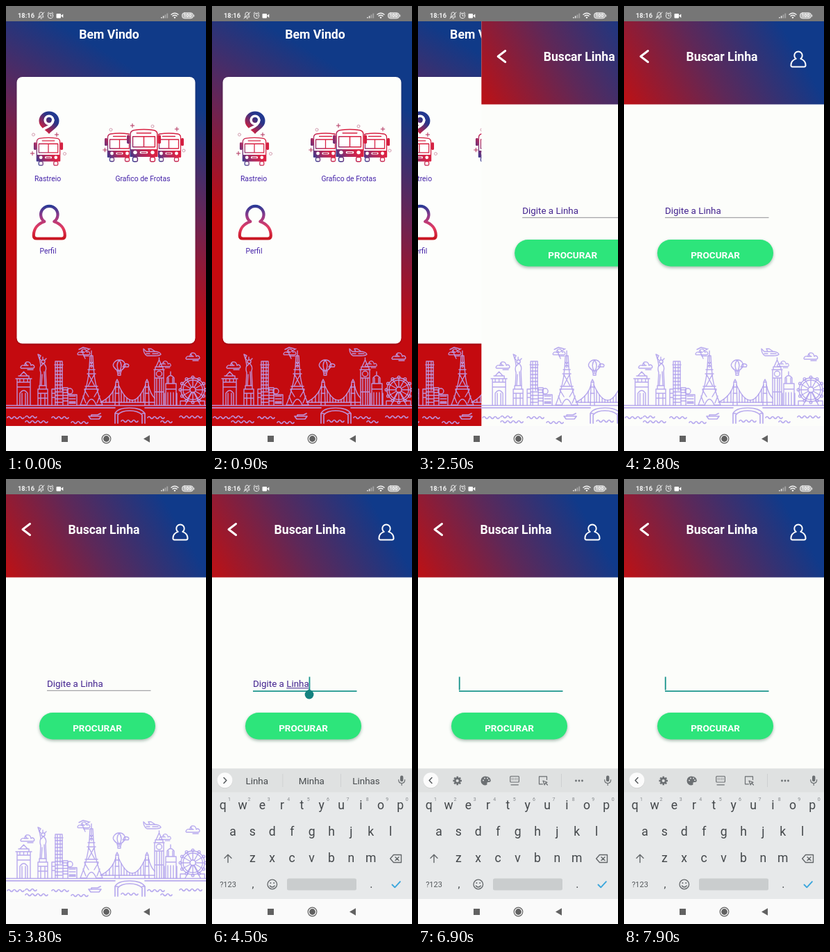
Recreate the animation shown at these times as an HTML page with a canvas. Size 288 px wide and 640 px high, loop 8 s.

```html
<!DOCTYPE html>
<html lang="pt">
<head>
<meta charset="utf-8">
<title>Buscar Linha</title>
<style>
html, body { margin: 0; width: 100%; height: 100%; overflow: hidden; background: #fff; }
canvas { display: block; width: 288px; height: 640px; }
</style>
</head>
<body>
<canvas id="stage"></canvas>
<script>
const W = 288, H = 640, LOOP = 8000;
const TEXT = 'Digite a Linha';
const SLIDE = 2380, SLIDE_LEN = 380;
const FOCUS = 4050, KEYS_UP = 4100, KEYS_LEN = 250;
const FIRST_DELETE = 5500, REPEAT = 5925, REPEAT_GAP = 75;
const CLEARED = REPEAT + (TEXT.length - 2) * REPEAT_GAP;

const canvas = document.getElementById('stage');
const dpr = window.devicePixelRatio || 1;
canvas.width = W * dpr;
canvas.height = H * dpr;
const c = canvas.getContext('2d');

const clamp = v => Math.max(0, Math.min(1, v));
const easeOut = v => 1 - Math.pow(1 - clamp(v), 3);

function rect(x, y, w, h, fill) { c.fillStyle = fill; c.fillRect(x, y, w, h); }
function round(x, y, w, h, r, fill) {
  c.beginPath();
  c.roundRect(x, y, w, h, r);
  if (fill) { c.fillStyle = fill; c.fill(); } else c.stroke();
}
function path(d, fill) {
  const p = new Path2D(d);
  if (fill) { c.fillStyle = fill; c.fill(p); } else c.stroke(p);
}
function circle(x, y, r, fill) {
  c.beginPath();
  c.arc(x, y, r, 0, 7);
  if (fill) { c.fillStyle = fill; c.fill(); } else c.stroke();
}
function pen(color, width) {
  c.strokeStyle = color;
  c.lineWidth = width;
  c.lineCap = c.lineJoin = 'round';
}
function text(s, x, y, size, color, weight = 400, align = 'center') {
  c.font = `${weight} ${size}px Roboto, sans-serif`;
  c.textAlign = align;
  c.fillStyle = color;
  c.fillText(s, x, y);
}
function gradient(x0, y0, x1, y1, ...stops) {
  const g = c.createLinearGradient(x0, y0, x1, y1);
  stops.forEach((s, i) => g.addColorStop(i / (stops.length - 1), s));
  return g;
}
function at(x, y, scale, draw) {
  c.save();
  c.translate(x, y);
  c.scale(scale, scale);
  draw();
  c.restore();
}

function statusBar() {
  rect(0, 0, W, 22, '#767676');
  text('18:16', 17, 17, 9.3, '#f4f4f4', 700, 'left');
  pen('#eee', 1);
  path('M47 16h7l-1-2v-3q-.4-2-2.5-2t-2.5 2v3zM50 18h1.5M46 18l9-9');
  circle(64, 14, 3.7);
  path('M64 12v2.3h1.6M60 10.5l1.8-1.5M68 10.5l-1.8-1.5');
  round(72.5, 11, 6.5, 6.5, 1, '#fff');
  path('M79 14l3.3-2.6v5.6z', '#fff');
  for (let i = 0; i < 4; i++) rect(223 + i * 2.8, 16 - i * 1.8, 1.8, 1.5 + i * 1.8, i < 2 ? '#ddd' : '#a5a5a5');
  pen('#f4f4f4', 1.4);
  path('M238 12.2q5-4 10 0M240 14.4q3-2.4 6 0');
  circle(243, 16.6, 1.2, '#fff');
  pen('#eee', 1);
  round(253.5, 9.8, 16, 8, 3.5, '#b5b5b5');
  round(253.5, 9.8, 16, 8, 3.5);
  rect(270.3, 12.5, 1, 3, '#eee');
  text('100', 261.5, 16.3, 6.6, '#fff', 700);
}

function navBar() {
  rect(0, 604, W, 36, '#fafafa');
  rect(80, 618, 9, 9, '#616161');
  pen('#616161', 1.2);
  circle(144.5, 622.5, 6.3);
  circle(144.5, 622.5, 4.4, '#616161');
  path('M198 622.5l9-5.2v10.4z', '#616161');
}

function cloud(x, y, s = 1) {
  at(x, y, s, () => path('M-9 4h17q3-1 1-4q-2-2-4 0q-1-6-6-5q-3 1-3 5q-4-1-5 1q-2 2 0 3M-5 0h6M0 6h8M-3-3q2 1 2 3'));
}

function skyline(color) {
  pen(color, 1.4);
  // gate tower
  path('M16 574V536h19v38M14 536h23M18 532h15v4M20 532l5.5-6 5.5 6M16 548h19M20 574V557q5.500-8 11 0v17M16 541h19M20 536v5M25.500 536v5M31 536v5M23 557v17M28 557v17');
  // statue
  path('M46 574v-23h14v23M48 551v-5h10v5M46 557h14M46 564h14M49 546l1-19q-2-5 0-10l-2-12M58 546l-1-21q2-6-2-10M50 518l4-4M46 501l4 2-2 4zM52 530l-1 15M55 526l1 19M50 557v17M56 557v17');
  circle(53.5, 511.5, 2.5);
  path('M50 509l-2-2M53 508v-3M56 509l2-2');
  // high-rises
  path('M71 574V511h10v42M70 516h12M74 511v63M78 511v42M66 574v-23h5M82 574v-25h7v25M89 574v-15h13v15M66 557h5M66 563h5');
  for (let y = 520; y < 572; y += 5) path(`M71 ${y}h10`);
  for (let y = 552; y < 572; y += 4) path(`M82 ${y}h7M91 ${Math.min(571, y + 9)}h9`);
  circle(92, 554, 4);
  // lattice tower
  path('M123 496v7M121 503h4l1 17q2 30 13 54h-9q-7-17-14 0h-9q11-26 13-54zM118 523h10M117 529h12M114 547h18M113 551h20M123 503v17M119 530l9 17M127 530l-9 17M121 512l5 8M125 512l-5 8M113 552l6 10M133 552l-6 10M111 561l4 10M135 561l-4 10');
  // suspension bridge
  path('M157 574l1-33h4l1 33M200 574l1-33h4l1 33M158 541l2-4 2 4M201 541l2-4 2 4M157 548h6M200 548h6M157 557h6M200 557h6');
  path('M136 570q17-8 22-25M162 545q20 44 39 0M205 545q3 13 9 19M138 570h76');
  for (let x = 166; x < 200; x += 4) {
    const u = (x - 181.5) / 19.5;
    path(`M${x} ${567 - 22 * u * u}V570`);
  }
  path('M144 566v4M149 561v9M154 554v16');
  // clock tower
  path('M214 574v-51h13v51M213 523h15M215 523v-4h11v4M216 519l4.500-10 4.500 10M220.500 509v-3M214 535h13M217 536v38M221 536v38M224 536v38M214 555h13');
  circle(220.5, 529, 4);
  // cathedral
  path('M230 574v-31h15v31M232 543v-8q5-7 10 0v8M237 531v-5M230 551h15M228 574v-17M246 557v17M233 574v-18M237 574v-18M241 574v-18M234 535v8M240 535v8');
  // wheel
  circle(269, 552, 17);
  circle(269, 552, 14);
  circle(269, 552, 4);
  for (let i = 0; i < 12; i++) {
    const a = i * Math.PI / 6, x = Math.cos(a), y = Math.sin(a);
    path(`M${269 + 4 * x} ${552 + 4 * y}L${269 + 15 * x} ${552 + 15 * y}`);
    circle(269 + 18 * x, 552 + 18 * y, 1.8);
  }
  path('M268 555l-10 19M270 555l10 19M251 574v-6h7M286 574v-6h-7');
  // balloon
  path('M163 526q-11-7-8-12q3-5 8-5q6 0 8 5q3 5-8 12M163 526q-6-9 0-17q6 8 0 17M160 525l1 3h4l1-3M161 528v3h4v-3');
  path('M169 518q2-5 6-3q3 1 1 4h-8');
  // plane
  path('M198 493l4 4h14q6 1 7 4q-2 2-8 2h-12q-5-3-5-10M207 497l-2-4h4l6 4M209 503l-4 0M211 500h8M202 500h5');
  cloud(31, 517);
  cloud(229, 515, .85);
  cloud(269, 504);
  cloud(112, 498, .9);
  path('M110 498l4 9M114 497l7-4M105 494l6-3 8 2');
  // embankment and river
  pen(color, 1.7);
  path('M0 574.500H288M0 577.800H157M200 577.800H288');
  path('M157 600V586q4-8 21-8t22 8v14M161 600V588q5-6 17-6t18 6v12M157 586h4M196 586h4');
  for (const [x, y, n] of [[2, 592, 3], [28, 598, 4], [28, 591, 2], [66, 592, 3], [94, 599, 3], [204, 592, 3], [223, 598, 2], [250, 591, 4], [166, 597, 3]])
    path(`M${x} ${y}` + 'q2-3 4 0t4 0'.repeat(n));
  path('M119 590h18l-3 4h-12zM123 590v-2h9l4-2');
}

function bus(x, y, s) {
  at(x, y, s, () => {
    const paint = gradient(-18, 14, 16, -8, '#303a92', '#a52a62', '#dc2344', '#d41f40');
    round(-18, -20, 36, 38, 4, '#fff');
    pen(paint, 1.3);
    path('M-17 13V-15q0-4 4-5q13-2 26 0q4 1 4 5V13zM-14-12H14V1H-14zM-9-16.500H9M0-12V1');
    round(-21.5, -14, 4, 11, 1.5, paint);
    round(17.5, -14, 4, 11, 1.5, paint);
    rect(-17, 4, 34, 9.5, paint);
    circle(-11, 8, 2.4, '#fff');
    circle(11, 8, 2.4, '#fff');
    round(-5, 6.5, 10, 3, 1.2, '#fff');
    path('M-3 8h6');
    round(-14, 14, 6, 5.5, 1.5);
    round(8, 14, 6, 5.5, 1.5);
  });
}

function sparkles(dots, stars) {
  pen('#c98aa0', .8);
  dots.forEach(([x, y]) => circle(x, y, 2));
  pen('#b0305c', 1);
  stars.forEach(([x, y]) => path(`M${x - 2.7} ${y}h5.4M${x} ${y - 2.7}v5.4`));
}

function person(x, y, s, paint, width) {
  at(x, y, s, () => {
    pen(paint, width);
    path('M-7 10C-16 13-22.500 20-22.500 30Q-22.500 34.500-18 34.500H18Q22.500 34.500 22.500 30C22.500 20 16 13 7 10A12.200 12.200 0 1 0-7 10Z');
  });
}

function home() {
  rect(0, 22, W, 583, gradient(144, 66, 3, 301, '#103a88', '#6a2454', '#c40a0f'));
  text('Bem Vindo', 148.5, 47, 17.7, '#fff', 700);
  skyline('rgba(190,156,232,.92)');
  c.save();
  c.shadowColor = 'rgba(40,0,20,.35)';
  c.shadowBlur = 3 * dpr;
  c.shadowOffsetY = dpr;
  round(15.5, 102, 257, 383.5, 8, '#fdfefc');
  c.restore();

  const pin = gradient(53, 178, 73, 156, '#d9203c', '#7a2a66', '#2a3488', '#1f3a93');
  path('M62 184C57 178 47.500 174 47.500 165.500A14.500 14 0 0 1 76.500 165.500C76.500 174 67 178 62 184Z', pin);
  pen('#fff', 3.6);
  circle(62, 164, 5.8);
  path('M67.800 164q0 7-13 12.500');
  bus(61, 210, .98);
  sparkles([[39.5, 185], [84.5, 212.5]], [[73, 185], [38, 212]]);
  text('Rastreio', 60, 252, 10.4, '#4422a8');

  bus(163.5, 204, 1);
  bus(234.5, 204, 1);
  bus(198.5, 201.5, 1.14);
  sparkles([[151, 178], [211, 173], [256, 208]], [[182, 172], [246, 177], [142.5, 207]]);
  text('Grafico de Frotas', 197, 252, 10.4, '#4422a8');

  person(62.3, 300, 1, gradient(0, -13, 0, 35, '#283a96', '#9a3a88', '#e23a60', '#c8141f'), 4.2);
  text('Perfil', 60.5, 356, 10.4, '#4422a8');
}

function search(t) {
  rect(0, 22, W, 583, '#fcfdfa');
  rect(0, 22, W, 119.5, gradient(14, 150, 226, 26, '#b81218', '#5e2858', '#103a8a'));
  pen('#fff', 3);
  path('M34.500 64.500L24 72.500L34.500 80.500');
  text('Buscar Linha', 141, 79, 17.6, '#fff', 700);
  person(251, 71.2, .47, '#fff', 4.2);
  skyline('rgba(172,156,236,.85)');

  c.save();
  c.shadowColor = 'rgba(0,60,30,.35)';
  c.shadowBlur = 4 * dpr;
  c.shadowOffsetY = 2 * dpr;
  round(48, 336, 167, 38.5, 19.2, '#2de57b');
  c.restore();
  text('PROCURAR', 131.5, 363, 13.5, '#fff', 700);
  field(t);
}

function field(t) {
  const focused = t >= FOCUS;
  let gone = t >= FIRST_DELETE ? 1 : 0;
  if (t >= REPEAT) gone += 1 + Math.floor((t - REPEAT) / REPEAT_GAP);
  const shown = TEXT.slice(0, Math.max(0, TEXT.length - gone));
  text(shown, 59, 299, 13.4, '#43238f', 400, 'left');
  const end = 59 + c.measureText(shown).width;
  if (!focused) { rect(59, 303.8, 149.5, 1, '#8f8f95'); return; }

  rect(59, 304.3, 149.5, 1.7, '#16938a');
  const word = shown.lastIndexOf(' ') + 1;
  if (shown.length > word) {
    const start = 59 + c.measureText(shown.slice(0, word)).width;
    rect(start, 300.3, end - start, 1, '#43238f');
  }
  const deleting = t >= FIRST_DELETE && t < CLEARED;
  const since = t - (t >= CLEARED ? CLEARED : FOCUS);
  if (deleting || since % 1000 < 500) rect(end - .2, 284.5, 1.8, 19, '#16938a');
  if (t < FIRST_DELETE) {
    path(`M${end + .3} 302l5 4h-10z`, '#14827f');
    circle(end + .3, 310, 6.4, '#14827f');
  }
}

function toolbar(empty) {
  const ink = '#6b6f72';
  rect(0, 416.5, W, 34, '#dfe1e1');
  circle(18.5, 434, 11, '#c9cbcb');
  circle(18.5, 433.3, 11, '#fbfbfb');
  pen('#55595c', 1.5);
  path(empty ? 'M20 429.5l-3.8 4 3.8 4' : 'M17 429.5l3.8 4-3.8 4');
  if (empty) {
    pen(ink, 2.6);
    circle(56.7, 434, 3.4);
    c.lineCap = 'butt';
    for (let i = 0; i < 8; i++) {
      const a = i * Math.PI / 4, x = Math.cos(a), y = Math.sin(a);
      path(`M${56.7 + 4 * x} ${434 + 4 * y}L${56.7 + 6.3 * x} ${434 + 6.3 * y}`);
    }
    path('M98 427.7a6.4 6.4 0 1 0 0 12.6q2 0 1.4-2.2q-.5-2 1.6-2h1.8q2-.4 2-2.4q-.6-5.6-6.8-6', ink);
    for (const [x, y] of [[94, 433.5], [96, 430.5], [100, 430.5], [102, 433.3]]) circle(x, y, 1, '#dfe1e1');
    pen(ink, 1.2);
    round(132.8, 427.5, 12.6, 8.5, 1);
    for (let x = 135.5; x < 144; x += 2.4) path(`M${x} 430.2v.1M${x} 432.4v.1`);
    path('M134 439.8h10.4');
    path('M185.5 432.5v-4.7h-11v11h5M180 434l6 2.2-2.6 1.2-1.2 2.6zM184 437.5l2.5 2.5');
    rect(206, 424, .8, 19, '#c9cccd');
    for (const x of [227.5, 232, 236.5]) circle(x, 434, 1.4, ink);
  } else {
    text('Linha', 64.7, 439, 13.4, '#45494c');
    text('Minha', 143.3, 439, 13.4, '#45494c');
    text('Linhas', 222, 439, 13.4, '#45494c');
    rect(101.5, 424, .8, 19, '#cccfd0');
    rect(185, 424, .8, 19, '#cccfd0');
  }
  round(271, 426.5, 4.4, 8.6, 2.2, ink);
  pen(ink, 1.2);
  path('M268.7 432.5q0 5 4.5 5t4.5-5M273.2 437.5v3');
}

function keyRow(keys, x, y) {
  [...keys].forEach((k, i) => text(k, x + i * 28.4, y, 17.6, '#43474a'));
}

function keyboard(t) {
  const drop = 189 * (1 - easeOut((t - KEYS_UP) / KEYS_LEN));
  c.save();
  c.beginPath();
  c.rect(0, 22, W, 583);
  c.clip();
  c.translate(0, drop);
  rect(0, 416.5, W, 189, '#e7e9ea');
  toolbar(t >= CLEARED);
  keyRow('qwertyuiop', 15.7, 475);
  [...'1234567890'].forEach((n, i) => text(n, 25 + i * 28.4, 463, 7, '#85898c'));
  keyRow('asdfghjkl', 30, 513.3);
  keyRow('zxcvbnm', 58.3, 551);

  if (t >= FIRST_DELETE && t < CLEARED + 60) round(245.7, 531, 39.3, 30.5, 4, '#b8bbbd');
  pen('#63676a', 1.4);
  path('M23 551.5v-11M18 545.3l5-5 5 5');
  path('M261.5 540.5h11v11h-11l-4.8-5.5zM264 543.7l5 4.8M269 543.7l-5 4.8');

  text('?123', 23, 587, 11, '#55595c');
  text(',', 59, 587.5, 15, '#43474a');
  pen('#63676a', 1.3);
  circle(86.8, 583, 6.8);
  circle(84.4, 581, 1, '#63676a');
  circle(89.2, 581, 1, '#63676a');
  path('M83.4 585q3.4 4 6.8 0');
  round(108, 574.5, 100, 17, 2.5, '#cacdce');
  text('.', 229.3, 587.5, 16, '#43474a');
  pen('#3ba6dc', 1.9);
  path('M259.5 583.5l3.8 3.8 7.6-8.2');
  c.restore();
}

function page(x, draw) {
  c.save();
  c.translate(x, 0);
  c.beginPath();
  c.rect(0, 22, W, 583);
  c.clip();
  draw();
  c.restore();
}

function frame(now) {
  const t = now % LOOP;
  const slide = easeOut((t - SLIDE) / SLIDE_LEN);
  c.setTransform(dpr, 0, 0, dpr, 0, 0);
  rect(0, 0, W, H, '#fff');
  if (slide < 1) page(-W * .3 * slide, home);
  if (slide > 0) page(W * (1 - slide), () => search(t));
  if (t >= KEYS_UP) keyboard(t);
  statusBar();
  navBar();
  requestAnimationFrame(frame);
}
requestAnimationFrame(frame);
</script>
</body>
</html>
```
